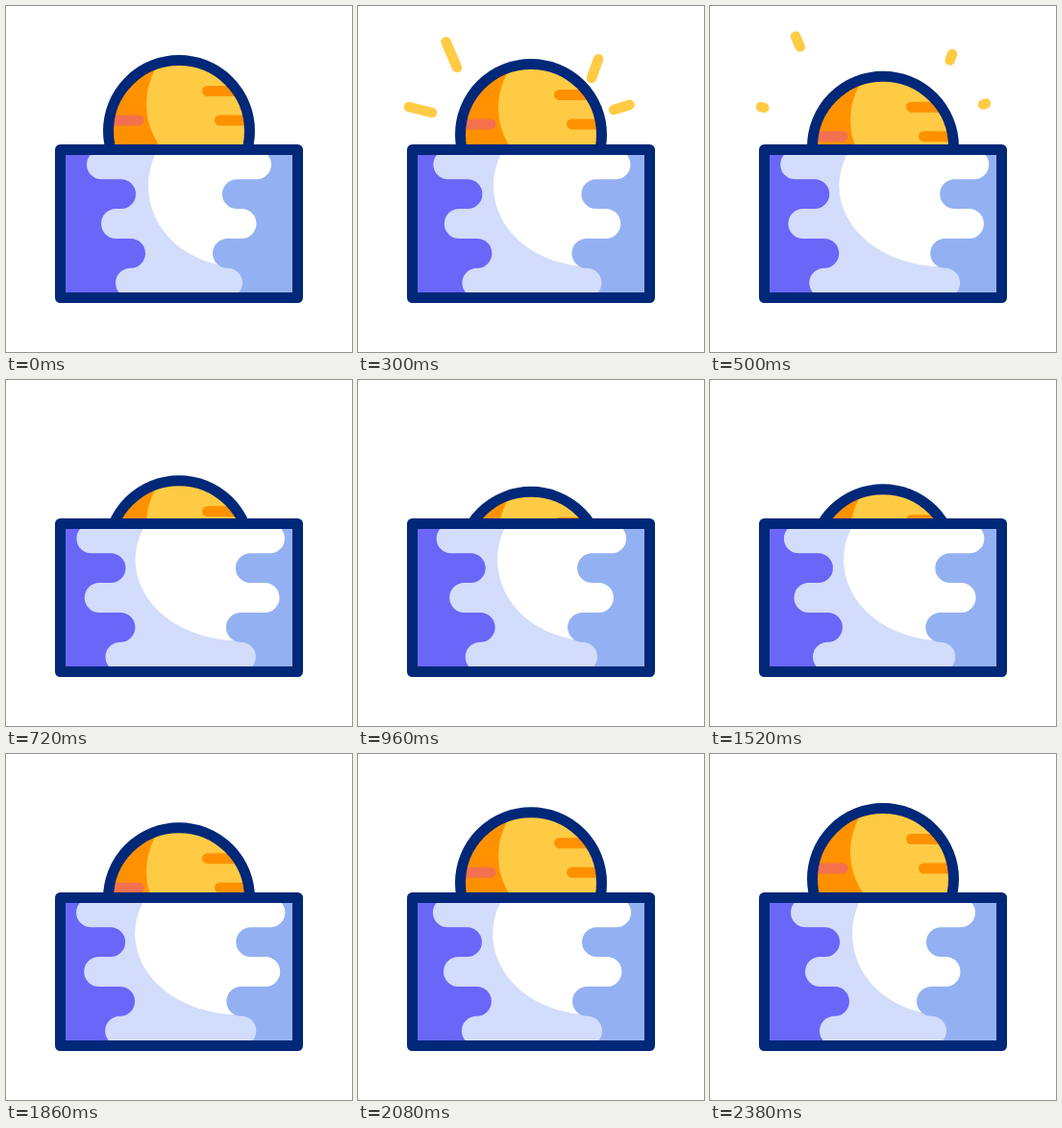
These frames come from a looping animation (360 px wide and 360 px high, 2.4 s). An HTML page:

```html
<!DOCTYPE html>
<html lang="en">
<head>
<meta charset="utf-8">
<title>Sunrise over ice</title>
<style>
  html, body { margin: 0; width: 100%; height: 100%; overflow: hidden; background: #fff; }
  svg { display: block; width: 100%; height: 100%; }
</style>
</head>
<body>
<svg viewBox="0 0 360 360" xmlns="http://www.w3.org/2000/svg">
  <defs>
    <clipPath id="disc"><circle cx="180" cy="130" r="70"/></clipPath>
    <clipPath id="pane"><rect x="57" y="150" width="246" height="153"/></clipPath>
  </defs>
  <g id="rays" stroke="#ffcb45" stroke-width="10.5" stroke-linecap="round"></g>
  <g id="sun">
    <g clip-path="url(#disc)">
      <circle cx="180" cy="130" r="70" fill="#ff9100"/>
      <circle cx="221" cy="102" r="75" fill="#ffcb45"/>
      <g stroke-width="11" stroke-linecap="round">
        <path d="M209.5 88.5H270M222.5 119H270" stroke="#ff9100"/>
        <path d="M90 119H138" stroke="#f4714e"/>
      </g>
    </g>
    <circle cx="180" cy="130" r="73.5" fill="none" stroke="#002878" stroke-width="11"/>
  </g>
  <g clip-path="url(#pane)">
    <rect x="57" y="150" width="246" height="153" fill="#d2dcfb"/>
    <path id="glow" fill="#fff"/>
    <path id="left" fill="#6a66f8"/>
    <path id="right" fill="#93b1f2"/>
  </g>
  <rect x="56.5" y="149.5" width="247" height="154" fill="none" stroke="#002878" stroke-width="11" stroke-linejoin="round"/>
</svg>
<script>
const LOOP = 2400, HALF = 1195;
const $ = id => document.getElementById(id);
const clamp = v => Math.min(1, Math.max(0, v));

// cubic-bezier(.7, 0, .3, 1)
function ease(x) {
  let lo = 0, hi = 1;
  for (let i = 0; i < 24; i++) {
    const s = (lo + hi) / 2, q = 1 - s;
    if (3 * q * q * s * 0.7 + 3 * q * s * s * 0.3 + s * s * s < x) lo = s; else hi = s;
  }
  return lo * lo * (3 - 2 * lo);
}

// 0 -> 1 -> 0 over one period
function swing(t, period) {
  const p = t / period % 1 * 2;
  return ease(p < 1 ? p : 2 - p);
}

// Inner point, outer point, growth start/end, retreat start/end
const rays = [
  { a: [103, 64], b: [89, 31.5], grow: [60, 400], fade: [300, 560] },
  { a: [77, 111], b: [53, 105], grow: [60, 300], fade: [300, 520] },
  { a: [243, 75], b: [252, 50], grow: [100, 400], fade: [310, 540] },
  { a: [266, 108], b: [287, 101.5], grow: [100, 400], fade: [310, 520] }
];
for (const r of rays) {
  r.el = document.createElementNS('http://www.w3.org/2000/svg', 'line');
  $('rays').appendChild(r.el);
}

function drawRay(r, t) {
  const part = ([from, to]) => clamp((t - from) / (to - from));
  const end = 1 - (1 - part(r.grow)) ** 1.4, start = part(r.fade) ** 1.6;
  const at = (k, i) => r.a[i] + (r.b[i] - r.a[i]) * k;
  const shown = t > r.grow[0] && t < r.fade[1];
  r.el.setAttribute('visibility', shown ? 'visible' : 'hidden');
  const s = Math.min(start, end);
  r.el.setAttribute('x1', at(s, 0));
  r.el.setAttribute('y1', at(s, 1));
  r.el.setAttribute('x2', at(end, 0));
  r.el.setAttribute('y2', at(end, 1));
}

// Edge of alternating round notches and fingers; side is 1 for left, -1 for right
function wave(tips, side) {
  const h = 30.8, r = h / 2, wall = side > 0 ? 50 : 310;
  let y = 149.5, d = `M${wall} ${y}`;
  tips.forEach((tip, i) => {
    const finger = i % 2, x = tip + (finger ? -r : r) * side;
    const sweep = (finger === 1) === (side > 0) ? 1 : 0;
    d += `H${x}A${r} ${r} 0 0 ${sweep} ${x} ${y += h}`;
  });
  return d + `H${wall}Z`;
}

function draw(ms) {
  const t = Math.min(ms, 2 * HALF);
  $('sun').setAttribute('transform', `translate(0 ${62 * swing(t, 2 * HALF)})`);
  rays.forEach(r => drawRay(r, t));

  const k = swing(t, HALF), a = 11 * k, b = 14.5 * k;
  $('left').setAttribute('d', wave([84 - a, 135 - a, 99 - 18 * k, 145 - a, 114 - a], 1));
  $('right').setAttribute('d', wave([276 + b, 225 + b, 260.5 + 25 * k, 215 + b, 246 + b], -1));
  $('glow').setAttribute('d', `M241 103A${93 + 14 * k} 84 0 0 0 241 271H310V103Z`);
}

const t0 = performance.now();
function tick() {
  draw((performance.now() - t0) % LOOP);
  requestAnimationFrame(tick);
}
tick();
</script>
</body>
</html>
```
